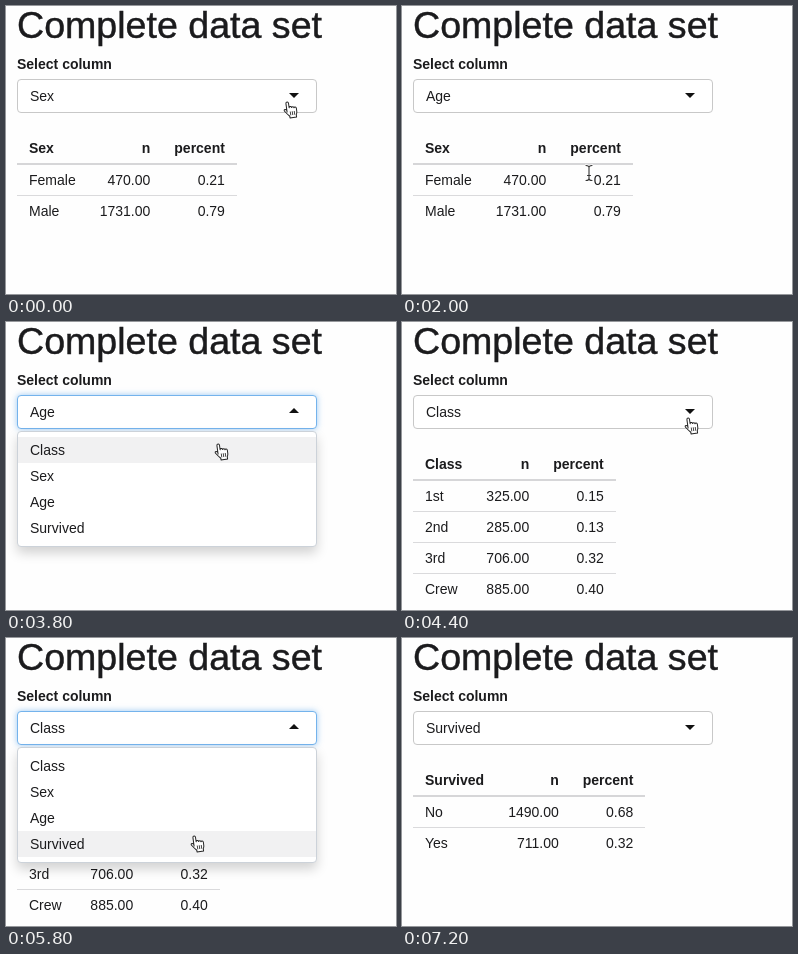
An HTML page for the animation above (7600 ms loop, 390x288 px).

```html
<!DOCTYPE html>
<html lang="en">
<head>
<meta charset="utf-8">
<title>Column summary</title>
<style>
  html, body { margin: 0; width: 100%; height: 100%; overflow: hidden; background: #fefefe; }
  body { position: relative; font: 14px "Liberation Sans", Arial, sans-serif; color: #1b1b1d; }
  body > * { position: absolute; box-sizing: border-box; margin: 0; }
  h1 { left: 11px; top: -1px; font-size: 37.6px; font-weight: 400; line-height: 40px;
       white-space: nowrap; -webkit-text-stroke: .45px; }
  label { left: 11px; top: 48px; font-weight: 700; line-height: 20px; }
  #box { left: 11px; top: 73px; width: 300px; height: 34px; padding-left: 12px;
         border: 1px solid #c8c8c8; border-radius: 4px; background: #fff; line-height: 33px; }
  #box::after { content: ""; position: absolute; left: 271px; top: 13px;
                border: 5px solid transparent; border-top-color: #111; border-bottom: 0; }
  .open #box { border-color: #74b3ec; box-shadow: 0 0 6px rgba(90, 165, 235, .6); }
  .open #box::after { top: 12px; border-bottom: 5px solid #111; border-top: 0; }
  .caret #box span { border-right: 1px solid #222; padding: 1px 0; }
  #menu { display: none; left: 11px; top: 109px; width: 300px; height: 116px; padding: 5px 0;
          border: 1px solid #ccd2d9; border-radius: 4px; background: #fff;
          box-shadow: 0 6px 12px rgba(0, 0, 0, .175); }
  .open #menu { display: block; }
  #menu div { padding-left: 12px; line-height: 26px; }
  #menu .on { background: #f1f1f2; }
  table { left: 11px; top: 127px; border-spacing: 0; line-height: 30px; white-space: nowrap; }
  th, td { padding: 0 12px; text-align: right; }
  th { border-bottom: 2px solid #d6d6d8; }
  th:first-child, td:first-child { text-align: left; }
  tr:nth-child(n+3) td { border-top: 1px solid #dadadc; }
  svg { left: 0; top: 0; width: 390px; height: 288px; }
  path { stroke-linejoin: round; stroke-linecap: round; }
</style>
</head>
<body>
<h1>Complete data set</h1>
<label>Select column</label>
<table id="table"></table>
<div id="box"></div>
<div id="menu"></div>
<svg>
  <g id="hand">
    <g transform="rotate(-8) translate(-5.5 -.5)" fill="#fff" stroke="#222">
      <path d="M4.2 10.5V2q0-1.5 1.3-1.5T6.8 2v4.5q0-1 1.2-1t1.3 1.2q.1-.8 1.2-.8t1.2 1.3q.2-.6 1-.6 1.2 0 1.2 1.4v3q0 2-1 3.3v2.4H6.3V15Q4 12.5 2 9.6q-.9-1.3 0-1.9 .9-.5 2.2 1z"/>
      <path d="M7.4 10.8v3m2-3v3m2-3v3" stroke-width=".8"/>
    </g>
  </g>
  <g id="beam" fill="none">
    <path d="M-3-7.5q3 0 3 2v11q0 2-3 2M3-7.5q-3 0-3 2m0 11q0 2 3 2M-1.5 2.5h3" stroke="#fff" stroke-width="2.6"/>
    <path d="M-3-7.5q3 0 3 2v11q0 2-3 2M3-7.5q-3 0-3 2m0 11q0 2 3 2M-1.5 2.5h3" stroke="#333" stroke-width="1.1"/>
  </g>
</svg>
<script>
const LOOP = 7600, STEP = 200, TOTAL = 2201;
const $ = id => document.getElementById(id);

const data = {
  Class: { "1st": 325, "2nd": 285, "3rd": 706, Crew: 885 },
  Sex: { Female: 470, Male: 1731 },
  Age: { Adult: 2092, Child: 109 },
  Survived: { No: 1490, Yes: 711 }
};

// step, selected column, column in the table, highlighted option (menu open when set)
const states = [
  [0, "Sex", "Sex"], [2, "Sex", "Sex", "Sex"], [7, "Sex", "Sex", "Age"],
  [9, "Age", "Sex"], [11, "Age", "Age"], [15, "Age", "Age", "Age"],
  [18, "Age", "Age", "Class"], [20, "Class", "Age"], [21, "Class", "Class"],
  [24, "Class", "Class", "Class"], [27, "Class", "Class", "Sex"],
  [28, "Class", "Class", "Age"], [29, "Class", "Class", "Survived"],
  [30, "Survived", "Class"], [31, "Survived", "Survived"]
];

// step, x, y, pointer shape
const moves = [
  [0, 281, 96, "hand"], [3, 281, 96, "hand"], [5, 233, 121, "hand"], [7, 195, 176, "hand"],
  [8, 195, 176, "hand"], [9, 190, 172, "beam"], [10, 187, 167, "beam"], [11, 197, 155, "beam"],
  [13, 262, 104, "hand"], [14, 287, 90, "hand"], [15, 291, 84, "beam"], [16, 292, 82, "beam"],
  [17, 262, 102, "beam"], [18, 212, 122, "hand"], [19, 212, 122, "hand"], [20, 225, 118, "beam"],
  [21, 265, 104, "hand"], [22, 286, 96, "hand"], [25, 286, 96, "hand"], [27, 232, 148, "hand"],
  [29, 188, 198, "hand"], [30, 188, 198, "beam"], [32, 165, 150, "beam"], [34, 151, 142, "none"]
];

const latest = (list, step) => list.findLastIndex(entry => entry[0] <= step);

function tableHtml(column) {
  const rows = Object.entries(data[column]).map(([name, n]) =>
    `<tr><td>${name}<td>${n.toFixed(2)}<td>${(n / TOTAL).toFixed(2)}</tr>`);
  return `<tr><th>${column}<th>n<th>percent</tr>` + rows.join("");
}

function drawPointer(step) {
  const i = latest(moves, step);
  const [start, x, y, shape] = moves[i];
  const [end, nextX, nextY] = moves[i + 1] || [start + 1, x, y];
  const k = (step - start) / (end - start);
  const place = `translate(${x + (nextX - x) * k} ${y + (nextY - y) * k})`;
  for (const id of ["hand", "beam"]) {
    $(id).setAttribute("transform", place);
    $(id).style.display = id === shape ? "" : "none";
  }
}

function draw(step) {
  const [, selected, shown, active] = states[latest(states, step)];
  document.body.classList.toggle("open", !!active);
  document.body.classList.toggle("caret", step >= 15 && step < 18);
  $("box").innerHTML = `<span>${selected}</span>`;
  $("menu").innerHTML = Object.keys(data).map(name =>
    `<div class="${name === active ? "on" : ""}">${name}</div>`).join("");
  $("table").innerHTML = tableHtml(shown);
  drawPointer(step);
}

const begin = performance.now();
let last = -1;
function tick() {
  const step = Math.floor((performance.now() - begin) % LOOP / STEP);
  if (step !== last) draw(last = step);
  requestAnimationFrame(tick);
}
tick();
</script>
</body>
</html>
```
